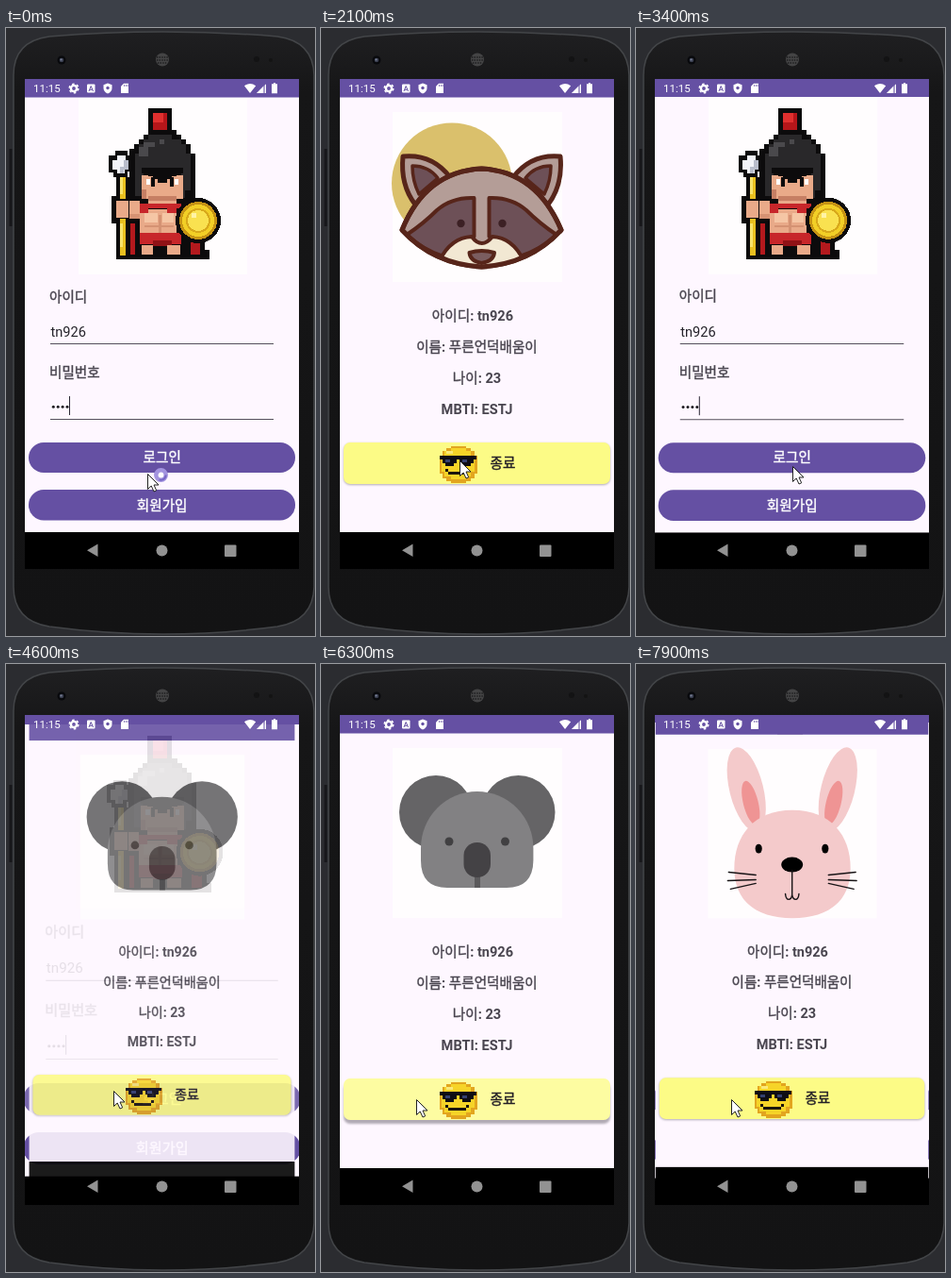
These frames come from a looping animation (328 px wide and 644 px high, 8000 ms). An HTML page:

```html
<!DOCTYPE html>
<html lang="ko">
<head>
<meta charset="utf-8">
<style>
html, body { margin: 0; width: 100%; height: 100%; overflow: hidden; background: #2b2c30; }
svg { display: block; width: 328px; height: 644px; }
text { font: 14.6px Roboto, "Noto Sans CJK KR", "Noto Sans CJK", sans-serif; white-space: pre; }
.bold { font-weight: 700; fill: #49454f; }
.ko { font-weight: 400; stroke-width: .4; }
.mid { text-anchor: middle; }
.pixel { shape-rendering: crispEdges; }
</style>
</head>
<body>
<svg viewBox="0 0 328 644">
  <defs>
    <clipPath id="screen"><rect x="20" y="54" width="291" height="519"/></clipPath>
    <clipPath id="loginShape"><rect x="24" y="439" width="283" height="32" rx="16"/></clipPath>
    <clipPath id="exitShape"><rect x="24" y="439" width="283" height="44" rx="7"/></clipPath>
    <clipPath id="face"><path d="M86 214Q111 152 170.500 149Q229 152 255 214Q222 250 170.500 253Q119 250 86 214Z"/></clipPath>
    <filter id="soft" x="-5%" y="-20%" width="110%" height="150%"><feGaussianBlur stdDeviation="1"/></filter>
    <linearGradient id="body" x2="0" y2="1">
      <stop stop-color="#1f1f21"/><stop offset=".1" stop-color="#161617"/><stop offset="1" stop-color="#131314"/>
    </linearGradient>
    <g id="page">
      <rect x="20" y="73" width="291" height="462" fill="#fef7ff"/>
      <rect x="20" y="54" width="291" height="19.500" fill="#6550a3"/>
      <rect x="20" y="534" width="291" height="39"/>
    </g>
  </defs>

  <rect width="328" height="644" fill="#2b2c30"/>
  <path d="M5 128v82" stroke="#17171a" stroke-width="3"/>
  <path d="M8 50Q8 14 46 9Q166 -1 288 9Q326 14 327 50V592Q326 628 288 634Q166 650 46 634Q8 628 8 592Z" fill="url(#body)" stroke="#434548" stroke-width="1.500"/>
  <circle cx="59" cy="34" r="4.500" fill="#08090c"/><circle cx="59" cy="34" r="2.300" fill="#3c4152"/><circle cx="58.500" cy="33.500" r="1" fill="#7d869c"/>
  <circle cx="166" cy="33.500" r="7" fill="#444445"/>
  <path d="M160 31h12M160 34h12M161 37h10" stroke="#1d1d1e" stroke-width="1.300" stroke-dasharray="1.400 1.200"/>
  <circle cx="266" cy="33" r="3" fill="#131314"/><circle cx="281" cy="34" r="2" fill="#131314"/>

  <g clip-path="url(#screen)">
    <rect x="20" y="54" width="291" height="519"/>
    <g id="login">
      <use href="#page"/>
      <rect x="77" y="74" width="179" height="187" fill="#fffdfe"/>
      <g id="soldier" class="pixel"></g>
      <text class="bold" x="46" y="289.500">아이디</text>
      <text x="47.500" y="326.500" fill="#25232a">tn926</text>
      <text class="bold" x="46" y="369.500">비밀번호</text>
      <path d="M47 334.500H284M47 414.500H284" stroke="#55505c" stroke-width="1.100"/>
      <g fill="#1d1b20"><circle cx="50.300" cy="401.300" r="1.500"/><circle cx="55.200" cy="401.300" r="1.500"/><circle cx="60.100" cy="401.300" r="1.500"/><circle cx="65" cy="401.300" r="1.500"/></g>
      <rect id="caret" x="67" y="390" width="1" height="20" fill="#2b2735"/>
      <rect x="24" y="439" width="283" height="32" rx="16" fill="#6550a3"/>
      <rect x="24" y="489" width="283" height="32.500" rx="16" fill="#6550a3"/>
      <g clip-path="url(#loginShape)"><circle id="loginRipple" fill="#fff" opacity=".14"/></g>
      <text class="bold mid" x="165.700" y="460" style="fill:#fff">로그인</text>
      <text class="bold mid" x="165.700" y="510.500" style="fill:#fff">회원가입</text>
    </g>

    <g id="home">
      <use href="#page"/>
      <rect x="76" y="89" width="180" height="180" fill="#fffdfe"/>

      <g id="raccoon" stroke="#57251a" stroke-width="5" stroke-linejoin="round">
        <circle cx="139" cy="164.500" r="64" fill="#dac06c" stroke="none"/>
        <g id="ear">
          <path d="M87 136Q118 133 137 158L100 187Q84 166 87 136Z" fill="#b49d97"/>
          <path d="M97 146Q114 146 124 159L104 176Q97 162 97 146Z" fill="#6d5057" stroke-width="3.500"/>
        </g>
        <use href="#ear" transform="matrix(-1 0 0 1 341 0)"/>
        <path d="M86 214Q111 152 170.500 149Q229 152 255 214Q222 250 170.500 253Q119 250 86 214Z" fill="#b49d97"/>
        <g clip-path="url(#face)">
          <g id="mask">
            <path d="M162.500 180Q139 179 123 193Q109 207 91 219Q108 235 130 242Q139 225 162.500 221Z" fill="#6d5057" stroke-width="4"/>
            <circle cx="148.500" cy="207" r="4.200" fill="#3c2024" stroke="none"/>
          </g>
          <use href="#mask" transform="matrix(-1 0 0 1 341 0)"/>
          <path d="M126 246Q138 222 160 221Q170.500 235 182 221Q203 222 215 246L170.500 256Z" fill="#f2e8d3" stroke-width="4"/>
        </g>
        <path d="M86 214Q111 152 170.500 149Q229 152 255 214Q222 250 170.500 253Q119 250 86 214Z" fill="none"/>
        <path d="M157.500 238Q170.500 234 184 238Q183 247 170.500 249Q158.500 247 157.500 238Z" fill="#7b5d60" stroke-width="4"/>
      </g>

      <g id="koala">
        <circle cx="122" cy="157" r="39" fill="#656466"/><circle cx="209.500" cy="157" r="39" fill="#656466"/>
        <path d="M106 195A59.700 60 0 0 1 225.400 195V208Q225 237 197 237H134Q106 237 106 208Z" fill="#828183"/>
        <circle cx="136" cy="188" r="4.500" fill="#414042"/><circle cx="195.500" cy="188" r="4.500" fill="#414042"/>
        <path d="M163 220h6v17h-6z" fill="#5a595b"/>
        <rect x="151.500" y="189" width="28.500" height="37" rx="14" fill="#444245"/>
      </g>

      <g id="rabbit">
        <g id="longEar" transform="rotate(-14 116 128)">
          <ellipse cx="116" cy="132" rx="18" ry="46" fill="#f4cacb"/>
          <ellipse cx="117" cy="147" rx="8" ry="24" fill="#ef9494"/>
        </g>
        <use href="#longEar" transform="matrix(-1 0 0 1 331.500 0)"/>
        <path d="M166 154C207 154 228 181 228 216C228 252 203 269 166 269C129 269 104 252 104 216C104 181 125 154 166 154Z" fill="#f4cacb"/>
        <ellipse cx="130" cy="195" rx="3.600" ry="5"/><ellipse cx="201" cy="195" rx="3.600" ry="5"/>
        <ellipse cx="165.700" cy="212" rx="11.500" ry="8"/>
        <g fill="none" stroke="#181416" stroke-width="1.400" stroke-linecap="round">
          <path d="M165.700 218V244M158.500 243Q159 249 162 249Q165 249 165.700 244Q166.500 249 169.500 249Q172.500 249 173 243"/>
          <path id="whiskers" d="M98 220L127 223M97 229L127 228M100 238L127 232"/>
          <use href="#whiskers" transform="matrix(-1 0 0 1 331.500 0)"/>
        </g>
      </g>

      <text class="bold mid" x="161" y="310">아이디: tn926</text>
      <text class="bold mid" x="165.500" y="342.500">이름: 푸른언덕배움이</text>
      <text class="bold mid" x="165.500" y="375.500">나이: 23</text>
      <text class="bold mid" x="165.500" y="408.500">MBTI: ESTJ</text>

      <rect id="shade" x="24" y="440" width="283" height="44" rx="7" fill="#66606c" opacity=".5" filter="url(#soft)"/>
      <rect x="24" y="439" width="283" height="44" rx="7" fill="#fcfb86"/>
      <g clip-path="url(#exitShape)"><circle id="exitRipple" fill="#fff" opacity=".22"/></g>
      <g class="pixel">
        <path d="M138 443H154V445H159V448H163V453H166V472H163V477H159V480H154V482H138V480H133V477H129V472H126V453H129V448H133V445H138Z" fill="#e2a51f"/>
        <path d="M138 445H154V448H159V453H163V470H159V475H154V478H138V475H131V470H128V453H131V448H138Z" fill="#f6d428"/>
        <path d="M133 448h7v3h-7z" fill="#fbea78"/>
        <path d="M126 453H165V457H162V461H159V464H150V461H147V457H144V461H141V464H132V461H129V457H126Z" fill="#0e0d14"/>
        <path d="M132 457h5v3h-5zM150 457h5v3h-5z" fill="#34406f"/>
        <path d="M132 467h3v3h-3zM135 470h19v3h-19zM154 467h3v3h-3z" fill="#1c150d"/>
      </g>
      <text class="bold" x="179.500" y="465.500" style="fill:#242027">종료</text>
    </g>

    <g fill="#fff">
      <text x="29" y="68" style="font-size:11.600px">11:15</text>
      <circle cx="72" cy="64" r="3.100" fill="none" stroke="#fff" stroke-width="2.400"/>
      <circle cx="72" cy="64" r="4.800" fill="none" stroke="#fff" stroke-width="1.500" stroke-dasharray="2.500 2.530"/>
      <rect x="86" y="59.500" width="8.500" height="9" rx="1"/>
      <path d="M88 67l2.200-5.500L92.500 67M89 65.300h2.600" fill="none" stroke="#6550a3"/>
      <path d="M108 58.500l4.500 1.700v3.300q0 4-4.500 6q-4.500-2-4.500-6v-3.300z"/><circle cx="108" cy="63.500" r="1.700" fill="#6550a3"/>
      <path d="M125 58.700h5v10.300h-8v-7.300z"/><path d="M125.500 60v2M127.300 60v2M129 60v2" stroke="#6550a3" stroke-width=".7"/>
      <path d="M253 61.300q6-4.800 12.200 0L259 69z"/>
      <path d="M276 59v10h-10z" opacity=".45"/><path d="M273 62v7h-7zM275 60h1v9h-1z"/>
      <path d="M284 58h2v1.200h2v10h-6v-10h2z"/>
    </g>
    <g fill="#929292">
      <path d="M97.500 546.500v13.500L86 553.300z"/><circle cx="165.500" cy="553.500" r="6"/><rect x="232" y="547.500" width="12.500" height="12.500" rx="1"/>
    </g>
  </g>

  <g id="pointer">
    <path d="M.5.500V16.500L4.200 13L7 19L9.700 17.800L7 12H12Z" fill="#fff" stroke="#222" stroke-width="1" stroke-linejoin="round"/>
    <g id="busy"><circle cx="14.500" cy="1.500" r="5.200" fill="#fff" stroke="#a394df" stroke-width="4.500"/><circle cx="14.500" cy="1.500" r="5.200" fill="none" stroke="#7767c4" stroke-width="2" stroke-dasharray="10 23"/></g>
  </g>
</svg>
<script>
const $ = id => document.getElementById(id);
const LOOP = 8000, STEP = 100, MOVE = 450, SPREAD = 250;

const disc = r => `M${204 - r} 204a${r} ${r} 0 1 1 ${2 * r} 0a${r} ${r} 0 1 1 ${-2 * r} 0Z`;

// Blocky soldier, painted back to front
const soldier = [
  ['#0c0b0c', 'M151 85H176V113H151Z'],
  ['#b5161a', 'M156 90H171V108H156Z'],
  ['#e0302f', 'M156 90H167V100H156Z'],
  ['#0c0b0c', 'M127 192H142V245H117V195Z M185 222H211V235H216V245H185Z'],
  ['#b3191d', 'M132 197H142V240H132Z M196 225H206V240H196Z'],
  ['#0c0b0c', 'M151 108H181V113H186V118H191V123H196V133H201V182H196V192H190V245H137V207H112V178H131V128H136V123H141V118H146V113H151Z'],
  ['#29282a', 'M151 113H176V118H186V123H191V133H196V172H190V180H186V152H146V178H137V133H141V123H146V118H151Z'],
  ['#4a494c', 'M146 121H158V126H151V136H141V126H146Z M163 118H168V123H163Z'],
  ['#e9aa89', 'M144 156H188V181H181V186H151V181H144Z'],
  ['#c67f64', 'M151 178H181V183H151Z M144 171H149V181H144Z'],
  ['#0c0b0c', 'M144 148H188V154H181V157H176V160H171V164H161V160H156V157H151V154H144Z M154 158H158V168H154Z M174 158H178V168H174Z'],
  ['#fff', 'M149 160H153V166H149Z M179 160H183V166H179Z'],
  ['#e9aa89', 'M117 183H142V192H181V219H142V202H117Z'],
  ['#f5c6a5', 'M147 196H161V206H147Z M166 196H178V206H166Z M119 185H127V193H119Z'],
  ['#d59273', 'M162 198H165V219H162Z M147 209H178V211H147Z M130 197H142V202H130Z'],
  ['#c7262a', 'M142 186H186V191H181V196H171V191H151V196H142Z M142 217H186V229H176V225H156V229H142Z'],
  ['#8f1216', 'M156 225H176V231H156Z'],
  ['#e9aa89', 'M144 230H156V240H144Z M171 230H185V240H171Z'],
  ['#0c0b0c', 'M116 130H129V135H134V152H129V158H131V245H117V158H114V153H109V135H116Z'],
  ['#f2f3f8', 'M118 135H127V140H130V150H126V154H118V150H113V140H118Z'],
  ['#b8bdcb', 'M125 140H130V150H125V154H121V147H125Z'],
  ['#e9c01f', 'M121 158H127V181H121Z M121 202H127V241H121Z'],
  ['#f8e46c', 'M121 158H124V176H121Z M121 207H124V232H121Z'],
  ['#e9aa89', 'M117 183H130V201H117Z'],
  ['#0c0b0c', disc(24)],
  ['#c69314', disc(20)],
  ['#f2cf26', disc(17)],
  ['#d8a91b', disc(13)],
  ['#f9e150', disc(11)],
  ['#fff3a5', 'M197 196H202V201H197Z']
];
$('soldier').innerHTML = soldier.map(([c, d]) => `<path fill="${c}" d="${d}"/>`).join('');

// Korean runs get a thin outline instead of a true bold face
for (const el of document.querySelectorAll('text.bold')) {
  const ink = el.style.fill || '#49454f';
  el.innerHTML = el.textContent.replace(/[가-힣]+/g, s => `<tspan class="ko" stroke="${ink}">${s}</tspan>`);
}

// Each visit: login pressed, home opens, exit pressed, home closes
const visits = [
  { tap: 1050, open: 1230, press: 2950, close: 3160, pic: 'raccoon' },
  { tap: 4350, open: 4483, press: 5750, close: 6360, pic: 'koala' },
  { tap: 7550, open: 7648, press: 9000, close: 9000, pic: 'rabbit' }
];
const caretOff = [[300, 800], [3700, 4200], [6900, 7400]];
const path = [
  [0, 150, 472], [100, 150, 472], [400, 147, 458], [500, 147, 458], [900, 142, 450],
  [2000, 142, 450], [2100, 147, 458], [2400, 160, 464], [2700, 160, 464], [2800, 166, 464],
  [3600, 166, 464], [4200, 114, 452], [4900, 114, 452], [5200, 120, 452], [5300, 101, 461], [8000, 101, 461]
];

const clamp = x => Math.max(0, Math.min(1, x));
const cubic = (s, a, b, c, d) => {
  const r = 1 - s;
  return a * r ** 3 + 3 * b * r * r * s + 3 * c * r * s * s + d * s ** 3;
};

// Fast out, extra slow in: two joined cubics
function ease(u) {
  if (u <= 0 || u >= 1) return clamp(u);
  const [xs, ys] = u < 1 / 6
    ? [[0, .05, .1333, 1 / 6], [0, 0, .06, .4]]
    : [[1 / 6, .2083, .25, 1], [.4, .82, 1, 1]];
  let lo = 0, hi = 1;
  for (let i = 0; i < 24; i++) {
    const m = (lo + hi) / 2;
    if (cubic(m, ...xs) < u) lo = m; else hi = m;
  }
  return cubic(lo, ...ys);
}

function zoom(el, k) {
  el.setAttribute('transform', `translate(165.5 313.5) scale(${k}) translate(-165.5 -313.5)`);
}

function pointerAt(t) {
  const i = path.findIndex(k => k[0] > t);
  const [t0, x0, y0] = path[i - 1], [t1, x1, y1] = path[i];
  const p = (t - t0) / (t1 - t0);
  return [x0 + (x1 - x0) * p, y0 + (y1 - y0) * p];
}

// Spreads from the pointer and stays until the page has changed
function ripple(el, t, start, end) {
  const on = t >= start && t < end + MOVE;
  if (on) {
    const [x, y] = pointerAt(start);
    el.setAttribute('cx', x);
    el.setAttribute('cy', y);
  }
  el.setAttribute('r', on ? 210 * clamp((t - start) / SPREAD) : 0);
}

function draw(t) {
  const visit = visits.find(v => t >= v.tap && t < v.close + MOVE);
  let alpha = 0, loginScale = 1;
  if (visit) {
    const closing = t >= visit.close;
    const u = clamp((t - (closing ? visit.close : visit.open)) / MOVE);
    const p = ease(u), fade = clamp((u - .1) / .18);
    alpha = closing ? 1 - fade : fade;
    loginScale = closing ? 1.05 - .05 * p : 1 + .05 * p;
    zoom($('home'), closing ? 1 - .1 * p : .85 + .15 * p);
    for (const v of visits) $(v.pic).style.display = v === visit ? '' : 'none';
    ripple($('loginRipple'), t, visit.tap, visit.open);
    ripple($('exitRipple'), t, visit.press, visit.close);
    $('shade').setAttribute('y', 440 + 3 * clamp((t - visit.press) / SPREAD));
  }
  $('home').setAttribute('opacity', alpha);
  zoom($('login'), loginScale);
  $('caret').style.display = caretOff.some(([a, b]) => t >= a && t < b) ? 'none' : '';
  const [x, y] = pointerAt(t);
  $('pointer').setAttribute('transform', `translate(${x} ${y})`);
  $('busy').style.display = t < 200 ? '' : 'none';
}

const began = performance.now();
function tick() {
  const t = (performance.now() - began) % LOOP;
  draw(Math.floor(t / STEP) * STEP);
  requestAnimationFrame(tick);
}
tick();
</script>
</body>
</html>
```
